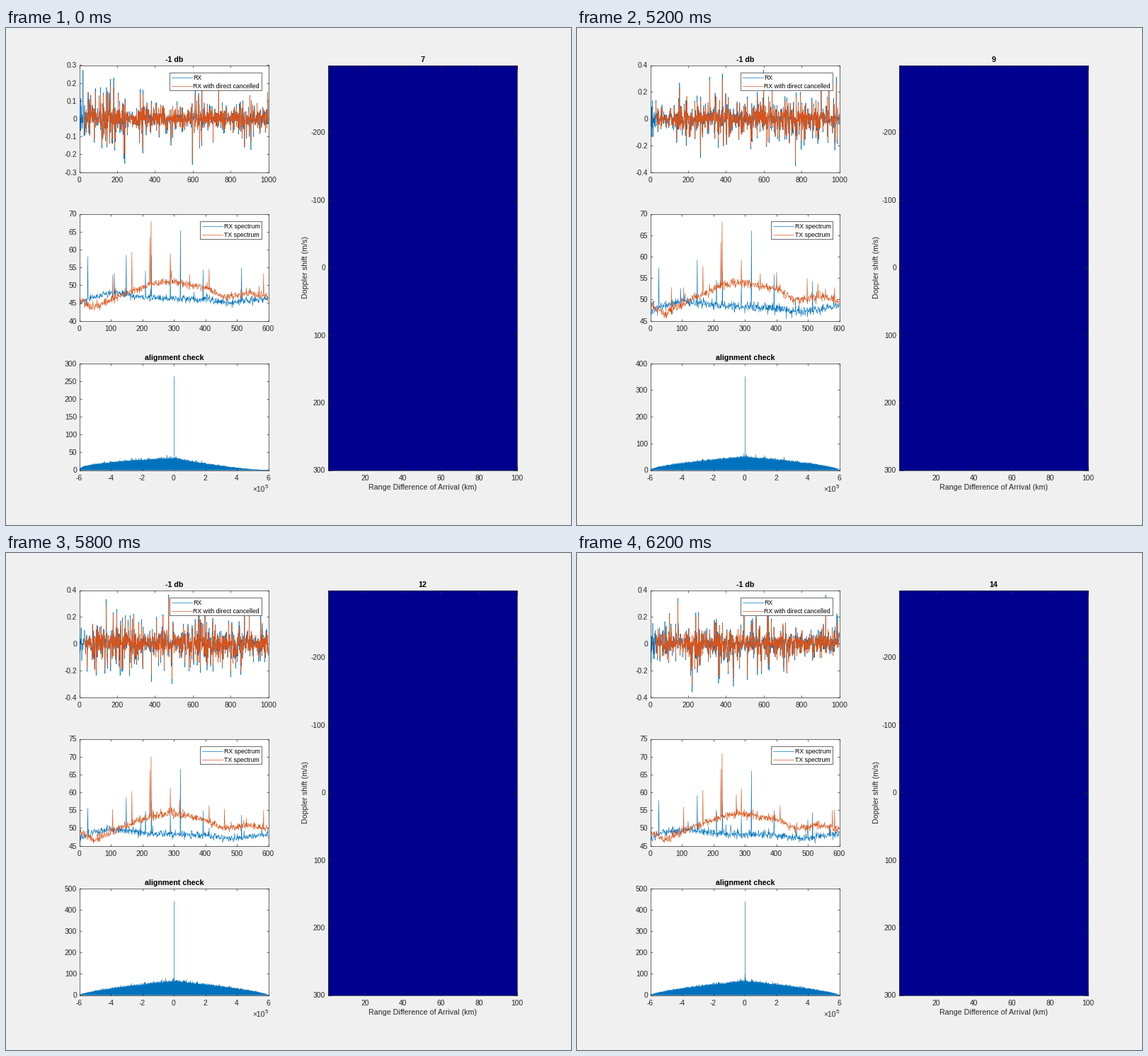
These frames come from a looping animation (798 by 702 pixels, 6400 ms). A matplotlib script:

```python
import numpy as np
import matplotlib.pyplot as plt
from matplotlib.animation import FuncAnimation
from matplotlib.patches import Polygon, Rectangle
from matplotlib.lines import Line2D
from matplotlib.transforms import Affine2D

W, H = 798, 702
STEP, FRAMES = 200, 32
HOLD = 25                      # steps the first block stays
THIN = .67
BLUE, ORANGE, INK, NAVY = "#0072BD", "#D95319", "#262626", "#00008F"

plt.rcParams.update({"font.family": "Liberation Sans", "font.size": 10.3,
                     "axes.linewidth": THIN, "path.simplify": False})

fig = plt.figure(figsize=(W / 72, H / 72), dpi=72, facecolor="#F0F0F0")
px = Affine2D().scale(1 / W, -1 / H).translate(0, 1) + fig.transFigure

# Noise floors as key points, carriers as bin: level
RX_FLOOR = [0, 40, 110, 220, 400, 470, 600], [47, 48.6, 49.7, 48.4, 48, 47, 48.3]
TX_FLOOR = ([0, 45, 140, 220, 290, 400, 460, 545, 600],
            [49, 46.6, 50.3, 53, 54.1, 52.3, 49.7, 50.8, 49.5])
RX_TONES = {27: 57.5, 149: 59, 210: 54.5, 229: 57.5, 289: 53, 321: 66, 393: 55, 515: 54}
TX_TONES = {106: 53, 167: 58.5, 224: 64, 228: 68.7, 289: 59.3, 412: 54.3, 585: 53.5}


def number(v, _=None):
    return f"{round(v, 3) + 0:g}"


def panel(x0, y0, x1, y1, tick, color="white"):
    ax = fig.add_axes([x0 / W, 1 - y1 / H, (x1 - x0) / W, (y1 - y0) / H], facecolor=color)
    ax.tick_params(direction="in", top=True, right=True, length=tick, width=THIN,
                   color=INK, labelcolor=INK)
    ax.tick_params(axis="x", pad=6.5)
    ax.tick_params(axis="y", pad=3.3)
    for spine in ax.spines.values():
        spine.set_color(INK)
    ax.xaxis.set_major_formatter(number)
    ax.yaxis.set_major_formatter(number)
    return ax


def label(x, y, s, **kw):
    kw = {"ha": "center", "va": "baseline", "fontsize": 10.65, "color": INK, **kw}
    return fig.text(x, y, s, transform=px, **kw)


def title(x, y, s):
    return label(x, y, s, weight="bold", color="black")


def legend(x, y, w, names):
    fig.add_artist(Rectangle((x, y), w, 25, fc="white", ec=INK, lw=THIN, transform=px))
    for i, (name, color) in enumerate(zip(names, (BLUE, ORANGE))):
        row = y + 7 + 12 * i
        fig.add_artist(Line2D([x + 3, x + 32], [row, row], color=color, lw=THIN, transform=px))
        label(x + 34, row + 3.7, name, ha="left", fontsize=8.7, color="black")


def pair(ax):
    return [ax.plot([], [], color=c, lw=.6)[0] for c in (BLUE, ORANGE)]


def scale(ax, lo, hi, step):
    ax.set_ylim(lo, hi)
    ax.set_yticks(np.arange(lo, hi + step / 2, step))


def signal(rng, amp):
    n = 1000
    swell = np.interp(np.arange(n), np.linspace(0, n, 26), rng.uniform(.6, 1.4, 26))
    rx = np.clip(rng.laplace(0, .14 * amp, n) * swell, -.6 * amp, .6 * amp)
    rx *= rng.uniform(.75, 1, n)
    rx[rng.integers(0, n, 9)] = amp * rng.uniform(.6, .92, 9) * rng.choice([-1, 1], 9)
    clean = .86 * rx + rng.normal(0, .04 * amp, n)
    clean[:30] = 0
    return rx, clean


def spectrum(rng, floor, tones, lift, rise=0):
    n = np.arange(600)
    y = np.interp(n, *floor) + lift + rng.normal(0, .55, n.size)
    y += (rng.random(n.size) < .04) * rng.exponential(1.2, n.size)
    for f, level in tones.items():
        y[f] = level + rise + rng.normal(0, .6)
    return y


def skirt(rng, k):
    lag = np.linspace(-6, 6, 1200)
    power = min(.4 + .1 * k, .7) + 1.1 * (lag > 0) * (k == 0)
    top = (33 + 8 * min(k, 4)) * (1 - abs(lag) / 6) ** power
    top *= .95 + .06 * rng.exponential(1, lag.size)
    return np.column_stack([lag, top])


sig = panel(103.5, 52.5, 370.5, 203.5, 2.7)
spec = panel(103.5, 262.5, 370.5, 413.5, 2.7)
corr = panel(103.5, 473.5, 370.5, 624.5, 2.7)
heat = panel(454.5, 52.5, 721.5, 624.5, 5.7, NAVY)

sig.set(xlim=(0, 1000), xticks=range(0, 1001, 200))
spec.set(xlim=(0, 600), xticks=range(0, 601, 100))
corr.set(xlim=(-6, 6), xticks=range(-6, 7, 2))
heat.set(xlim=(.5, 100), ylim=(300, -299.5), xticks=range(20, 101, 20),
         yticks=range(-200, 301, 100))

sig_lines, spec_lines = pair(sig), pair(spec)
hill = corr.add_patch(Polygon([(0, 0), (1, 0), (0, 1)], fc=BLUE, ec=BLUE, lw=.4))
spike, = corr.plot([], [], color=BLUE, lw=THIN)
blips, = heat.plot([], [], "s", ms=1.4, mew=0, color="#0000A4")

title(237.5, 48.3, "-1 db")
title(237.5, 468.6, "alignment check")
count = title(588.5, 48.3, "7")
label(588.5, 652.4, "Range Difference of Arrival (km)")
label(422.5, 338.5, "Doppler shift (m/s)", rotation=90, va="center")
label(348, 655, "×10", ha="left", fontsize=10.3)
label(366, 650, "5", ha="left", fontsize=8)
legend(230.5, 62.5, 130, ("RX", "RX with direct cancelled"))
legend(273.5, 272.5, 87, ("RX spectrum", "TX spectrum"))


def draw(i):
    k = max(0, i - HOLD + 1)
    rng = np.random.default_rng(70 + k)
    count.set_text(str(7 + k))

    # The signal grows louder, so the limits widen with it
    amp = .3 if k < 2 else .4
    low, high = 40 if k < 2 else 45, 70 if k < 4 else 75
    peak = min(300 + 100 * max(k - 1, 0), 500)
    scale(sig, -amp, amp, .1 if amp < .4 else .2)
    scale(spec, low, high, 5)
    scale(corr, 0, peak, 50 if peak == 300 else 100)

    for line, y in zip(sig_lines, signal(rng, amp)):
        line.set_data(np.arange(y.size), y)
    levels = (spectrum(rng, RX_FLOOR, RX_TONES, min(k - 2, 0)),
              spectrum(rng, TX_FLOOR, TX_TONES, 3 * min(k - 1, 0), (high - 70) / 2.5))
    for line, y in zip(spec_lines, levels):
        line.set_data(np.arange(y.size), y)

    hill.set_xy(skirt(rng, k))
    spike.set_data([0, 0], [0, .88 * peak])
    blips.set_data(rng.uniform(5, 98, 2), rng.uniform(-280, 280, 2))


anim = FuncAnimation(fig, draw, frames=FRAMES, interval=STEP, repeat=True, repeat_delay=0)
plt.show()
```
